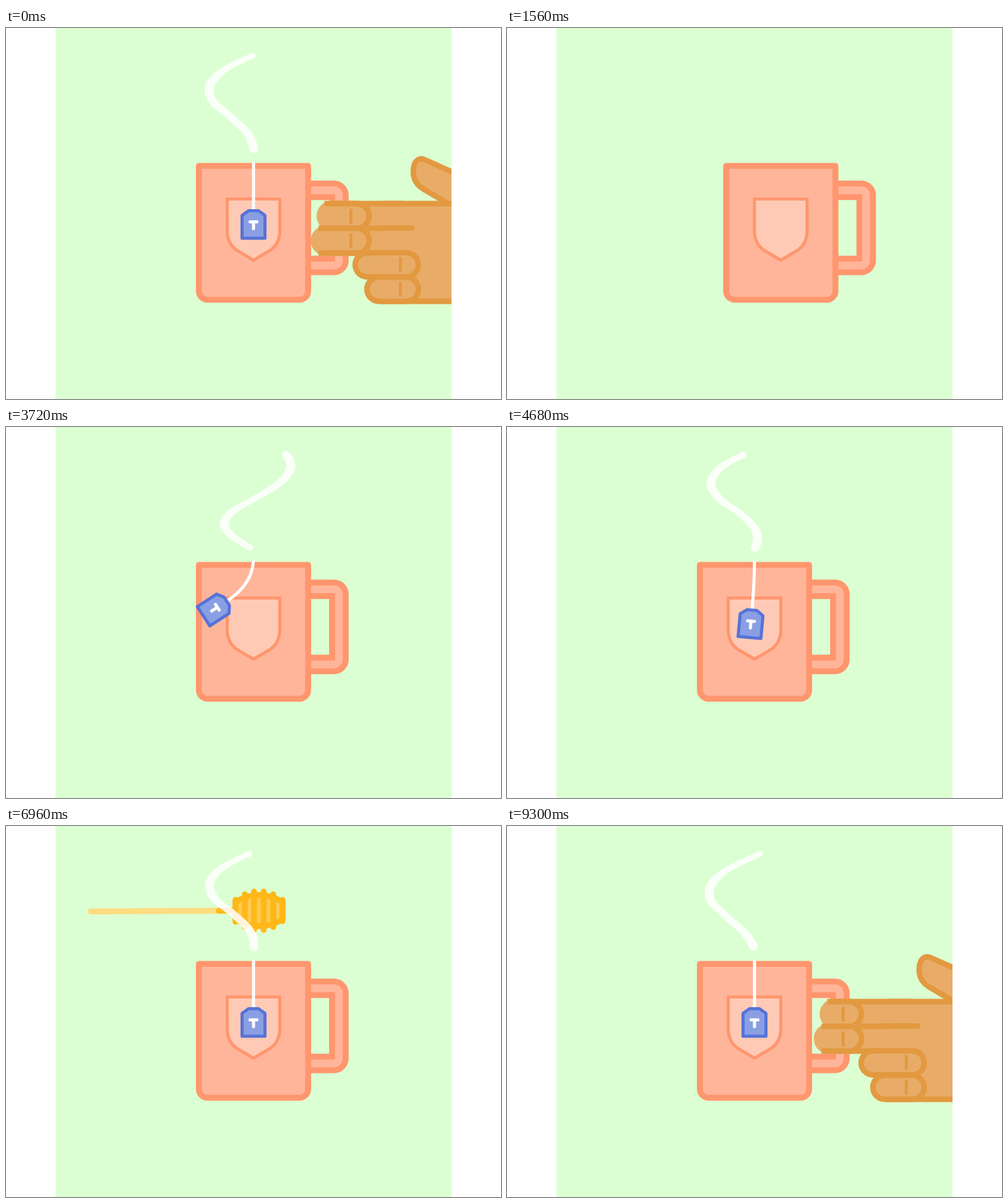
An HTML page that plays this animation: 800 px wide and 600 px high, repeating every 9360 ms.

```html
<!DOCTYPE html>
<html lang="en">
<head>
<meta charset="utf-8">
<title>Tea time</title>
<style>
html, body { margin: 0; width: 100%; height: 100%; overflow: hidden; background: #fff; }
svg { display: block; width: 100vw; height: 100vh; }
path, line { stroke-linecap: round; stroke-linejoin: round; }
.pink { fill: #ffb59a; stroke: #ff966e; stroke-width: 9.5; }
.bag { fill: none; stroke: #7ad6a0; stroke-width: 5; }
.thread { fill: none; stroke: #fff; stroke-width: 5; stroke-linecap: butt; }
.skin { fill: #e8ac68; stroke: none; }
.finger { fill: #e8ac68; stroke: #e39940; stroke-width: 9; }
.edge { fill: none; stroke: #e39940; stroke-width: 9; }
.crease { fill: none; stroke: #e39940; stroke-width: 4.8; }
.honey { fill: none; stroke: #ffb818; stroke-width: 9.5; }
</style>
</head>
<body>
<svg viewBox="0 0 800 600">
  <clipPath id="stage"><rect x="80" width="640" height="600"/></clipPath>
  <g clip-path="url(#stage)">
    <rect x="80" width="640" height="600" fill="#dbffd2"/>
    <g id="bag">
      <path class="thread" d="M400 -400V93"/>
      <path d="M355.5 110L374 94H426L445 110V208.5H355.5Z" fill="#eaffe3"/>
      <path d="M355.5 159H445V208.5H355.5Z" fill="#bbebd0"/>
      <path class="bag" d="M355.5 110L374 94H426L445 110V208.5H355.5ZH445M355.5 159H445M375 95L400 109L425 95"/>
      <path class="bag" d="M369 184.500l5 -4.500M389.500 174l4.500 -4.500M392 193.500l6.500 -6M417.500 179l5 -4.500M424.500 197l6 -6"/>
    </g>
    <g id="dipper">
      <path d="M137 138.300L346 137" stroke="#ffdc80" stroke-width="9.500"/>
      <path class="honey" d="M344 137H372"/>
      <path class="honey" style="fill:#ffcb55" d="M371 123Q409 100 447 123V151Q409 173 371 151Z"/>
      <path class="honey" d="M371 119.500V155M386 110.500V163.500M401 106V168M416.500 106V168M432 110.500V163.500M447 119.500V154"/>
    </g>
    <g id="mug">
      <g fill="none">
        <path id="loop" d="M488 262.500H530A8 8 0 0 1 538 270.500V376A8 8 0 0 1 530 384H488" stroke="#ff966e" stroke-width="31.500"/>
        <path d="M488 262.500H530A8 8 0 0 1 538 270.500V376A8 8 0 0 1 530 384H488" stroke="#ffb59a" stroke-width="12.500"/>
      </g>
      <path class="pink" d="M311.700 223H488.300V425.500A14 14 0 0 1 474.300 439.500H325.700A14 14 0 0 1 311.700 425.500Z"/>
      <path d="M357.500 276.500H442.500V331Q441 350 427 359.500L400 375.500L373 359.500Q359 350 357.500 331Z" fill="#ffcab5" stroke="#ff966e" stroke-width="5"/>
    </g>
    <g id="tea">
      <path id="thread" class="thread"/>
      <g id="tag">
        <path d="M-18.500 46V9L-8 1.500H8L18.500 9V46Z" fill="#8a9fe3" stroke="#5673d8" stroke-width="5"/>
        <path d="M-5.500 19.500H5.500M0 19.500V30.500" fill="none" stroke="#fff" stroke-width="5"/>
      </g>
    </g>
    <g id="hand">
      <path id="upper" class="skin"/>
      <g id="palm">
        <path class="finger" d="M745 243.500L677 213C668 209 661 214 659 225C656 243 663 253 674 260L725 290"/>
        <path class="skin" d="M600 284H1100V442H600Z"/>
        <path class="edge" d="M610 284H1100M604 442H1100M600 323.500H656"/>
        <path class="finger" d="M584 363.500H647A19.500 19.500 0 0 1 647 402.500H584A19.500 19.500 0 0 1 584 363.500Z"/>
        <path class="finger" d="M603 403H647A19.500 19.500 0 0 1 647 442H603A19.500 19.500 0 0 1 603 403Z"/>
        <path class="crease" d="M637.500 372.500V392.500M637.500 412.500V432.500"/>
      </g>
      <path id="rims" class="edge"/>
      <g id="folds"></g>
    </g>
    <path id="steam" fill="#fff" opacity=".85"/>
  </g>
</svg>
<script>
const LOOP = 9360;
const RAD = Math.PI / 180;
const $ = id => document.getElementById(id);
const set = (id, name, value) => $(id).setAttribute(name, value);
const move = (id, x, y = 0) => set(id, 'transform', `translate(${x} ${y})`);
const show = (id, on) => set(id, 'visibility', on ? 'visible' : 'hidden');
const clamp = v => Math.max(0, Math.min(1, v));
const span = (t, a, b) => clamp((t - a) / (b - a));
const smooth = p => p * p * (3 - 2 * p);
const easeInOut = p => p < .5 ? 2 * p * p : 1 - 2 * (1 - p) ** 2;

// Piecewise values: keys are [time, a, b, ...]
function track(t, keys) {
  let i = 1;
  while (i < keys.length - 1 && t > keys[i][0]) i++;
  const a = keys[i - 1], b = keys[i], p = span(t, a[0], b[0]);
  return a.slice(1).map((v, k) => v + (b[k + 1] - v) * p);
}

// Catmull-Rom through evenly spaced values
function spline(v, u) {
  const i = Math.min(v.length - 2, Math.floor(u)), f = u - i;
  const b = v[i], c = v[i + 1];
  const a = i ? v[i - 1] : 2 * b - c;
  const d = i + 2 < v.length ? v[i + 2] : 2 * c - b;
  return b + f / 2 * (c - a + f * (2 * a - 5 * b + 4 * c - d + f * (3 * (b - c) + d - a)));
}

const mugOut = t => Math.min(430, 101 * Math.max(0, (t - 500) / 400) ** 3);
const mugX = t => t < 1190 ? mugOut(t) : 430 * (1 - span(t, 1190, 1880)) ** 3;

// Steam: a wave rising from the rim, its top trailing the mug
const AMP = [67, 64, 62, 64, 76, 73, 45, 0];
const TURN = [42, 4, -32, -70, -104, -123, -134, -140];
const MID = [2, -4, -8, -11, -10, -8, -4, 0];

function steam(t) {
  const grow = t < 1400 ? 1 : span(t, 1700, 2700);
  show('steam', grow > 0);
  if (!grow) return;
  const drift = -14 * smooth(span(t, 1200, 1900)) * (1 - smooth(span(t, 7600, 9300)));
  const phase = 227 - t * 1440 / LOOP + drift;
  const base = t < 1400 ? mugOut : mugX;
  const at = y => {
    const u = (y - 44) / 22;
    return 400 + base(t - 1.4 * (196 - y)) + spline(MID, u)
      + spline(AMP, u) * Math.cos((spline(TURN, u) + phase) * RAD);
  };
  const top = 195 - 150 * grow, n = 48, left = [], right = [];
  let caps = '';
  for (let i = 0; i <= n; i++) {
    const y = top + (195 - top) * i / n, x = at(y);
    const slope = at(y + .5) - at(y - .5), len = Math.hypot(1, slope);
    const w = 7.3 / Math.sqrt(len), nx = w / len, ny = -slope * w / len;
    left.push(`${(x - nx).toFixed(2)} ${(y - ny).toFixed(2)}`);
    right.unshift(`${(x + nx).toFixed(2)} ${(y + ny).toFixed(2)}`);
    if (i % n === 0) {
      const r = Math.max(w, 5);
      caps += `M${x - r} ${y}a${r} ${r} 0 1 0 ${2 * r} 0a${r} ${r} 0 1 0 ${-2 * r} 0Z`;
    }
  }
  set('steam', 'd', `M${left.concat(right).join('L')}Z${caps}`);
}

// Keys: time, tag angle, thread angle at the rim, length of the free part
const FLIP = [
  [2700, -180, -180, 300], [2760, -168, -112, 270], [2820, -163, -104, 205],
  [2880, -160, -98, 165], [2940, -145, -88, 105], [3000, -128, -72, 64],
  [3120, -92, -34, 42], [3300, -28, -2, 41], [3480, 26, 2, 42],
  [3600, 49, 3, 46], [3720, 57, 3.5, 47]
];

function tea(t) {
  let rot = 0, lean, free;
  const hung = t < 1190 || t >= 2700;
  show('tea', hung);
  if (!hung) return;
  if (t < 1190) rot = 32 * Math.max(0, (t - 500) / 400) ** 2;
  else if (t < 3720) [rot, lean, free] = track(t, FLIP);
  else rot = 57 * Math.exp((3720 - t) / 420) * Math.cos((t - 3720) / 900 * 2 * Math.PI);
  if (lean === undefined) {
    lean = rot * .06;
    free = 39 + Math.abs(rot) * .15;
  }
  const x = 400 + mugX(t), y = 216;
  const cx = x - 39 * Math.sin(lean * RAD), cy = y + 39 * Math.cos(lean * RAD);
  const ex = cx - free * Math.sin(rot * RAD), ey = cy + free * Math.cos(rot * RAD);
  set('thread', 'd', `M${x} ${y}Q${cx} ${cy} ${ex} ${ey}`);
  set('tag', 'transform', `translate(${ex} ${ey}) rotate(${rot})`);
}

function bag(t) {
  const on = t > 2040 && t < 2700;
  show('bag', on);
  if (on) move('bag', 0, -243 + 423 * easeInOut(span(t, 2100, 2880)));
}

function dipper(t) {
  const on = t > 5900 && t < 9100;
  show('dipper', on);
  if (!on) return;
  const left = 1 - span(t, 5950, 6750);
  const enter = left ** 3;
  const sway = track(t, [[6960, 0], [7300, -16], [7560, -8], [8060, 54], [8240, 46]])[0];
  const x = sway - 400 * enter - 480 * span(t, 8240, 8820) ** 2;
  set('dipper', 'transform', `translate(${x} ${-140 * enter}) rotate(${22 * enter} 410 137)`);
}

function fold(x, end, y, closed) {
  const a = x + 24, b = Math.max(a, end - 24);
  const cap = `M${a} ${y}H${b}a20 20 0 0 1 0 40H${a}`;
  const left = 'a20 20 0 0 1 0 -40Z';
  const crease = `<path class="crease" d="M${end - 33.5} ${y + 10.5}v20"/>`;
  if (closed) return `<path class="finger" d="${cap}${left}"/>${crease}`;
  return `<path class="finger" style="stroke:#e8ac68" d="${cap}${left}"/>`
    + `<path class="edge" style="stroke-linecap:butt" d="M${a - 12} ${y}H${b}a20 20 0 0 1 0 40H${a - 12}"/>${crease}`;
}

function hand(t) {
  const on = t < 1190 || t > 8700;
  show('hand', on);
  if (!on) return;
  const clock = t > 8700 ? t - LOOP : t;
  const rest = 9 * Math.max(0, (254 - clock) / 254) ** 3;
  const far = Math.max(0, rest - 9);
  const tip = 502.5 + far * .4 + far * far * .0025;
  const end = tip + Math.max(46, 108 - 2.2 * rest);
  const closed = rest < 4;
  move('hand', mugX(t));
  move('palm', rest - 9);
  const root = 584 + rest - 9;
  const start = Math.min(tip + 24, root);
  set('upper', 'd', `M${start} 284H${root + 60}V364H${start}Z`);
  set('rims', 'd', `M${start} 284H${root + 60}M${start} 364H${root}M${start} 324H${root + 30}`);
  $('folds').innerHTML = fold(tip, end, 284, closed) + fold(tip - 9.5, end, 324, closed);
}

function draw(t) {
  move('mug', mugX(t));
  bag(t);
  tea(t);
  dipper(t);
  hand(t);
  steam(t);
}

const begin = performance.now();
function tick() {
  draw((performance.now() - begin) % LOOP);
  requestAnimationFrame(tick);
}
tick();
</script>
</body>
</html>
```
